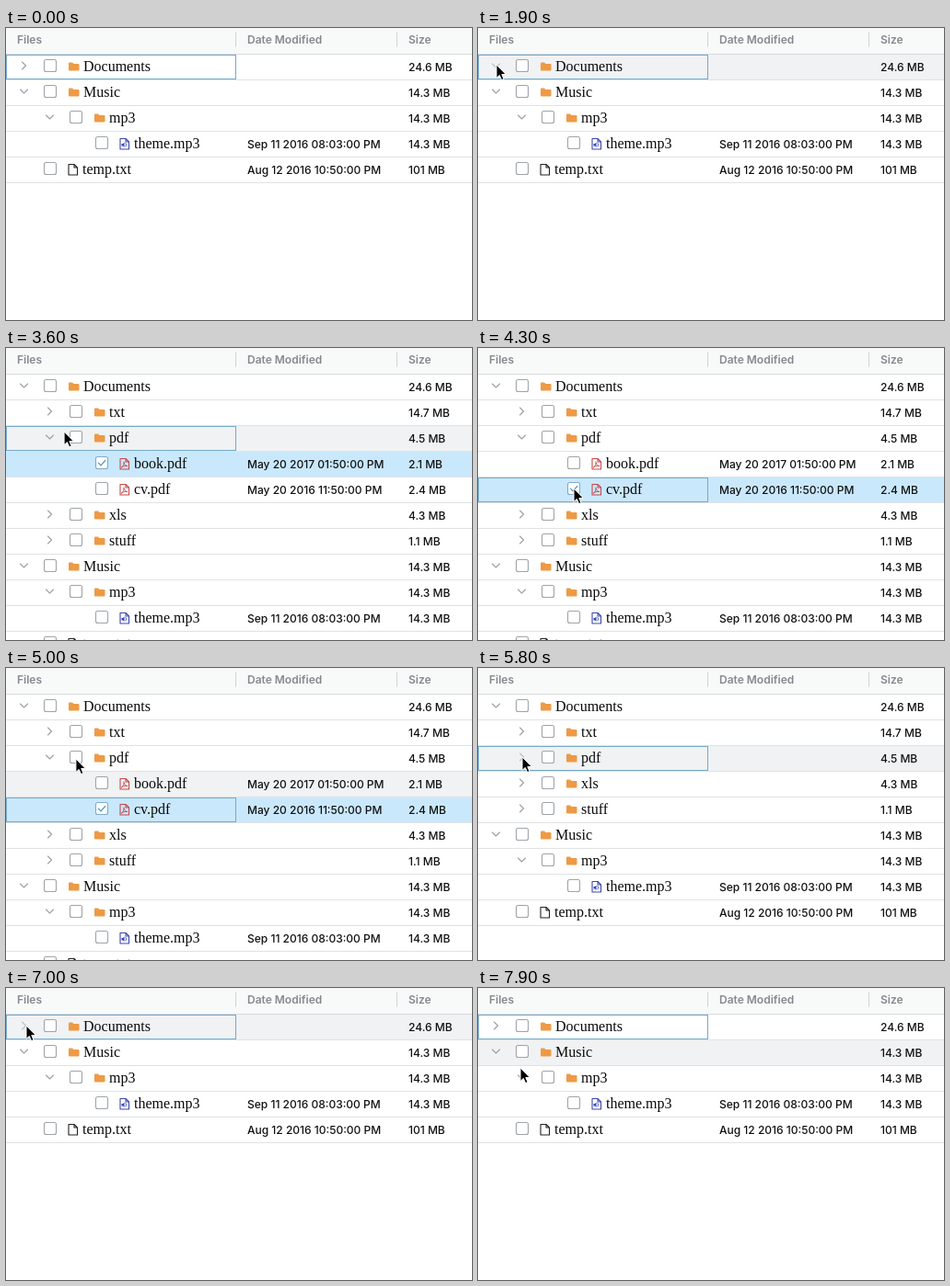
Animation, 506 px wide and 318 px high, one loop 8 s. Source, as an HTML page:

```html
<!DOCTYPE html>
<html>
<head>
<meta charset="utf-8">
<style>
html, body { margin: 0; width: 100%; height: 100%; overflow: hidden; background: #fff; }
svg { display: block; width: 506px; height: 318px; }
text { font: 500 12px Inter, Roboto, sans-serif; fill: #111; white-space: pre; }
.head { font-weight: 600; fill: #85898e; }
.name { font: 16px "Liberation Serif", "Times New Roman", serif; fill: #0a0a0a; }
.line { fill: none; stroke-linejoin: round; stroke-linecap: round; }
</style>
</head>
<body>
<svg id="stage" viewBox="0 0 506 318"></svg>
<script>
const LOOP = 8000, ROW = 28, TOP = 28;
const stage = document.getElementById('stage');

// name, level, kind, size, date, parent
const files = [
  ['Documents', 0, 'folder', '24.6 MB'],
  ['txt', 1, 'folder', '14.7 MB', '', 'Documents'],
  ['pdf', 1, 'folder', '4.5 MB', '', 'Documents'],
  ['book.pdf', 2, 'pdf', '2.1 MB', 'May 20 2017 01:50:00 PM', 'pdf'],
  ['cv.pdf', 2, 'pdf', '2.4 MB', 'May 20 2016 11:50:00 PM', 'pdf'],
  ['xls', 1, 'folder', '4.3 MB', '', 'Documents'],
  ['stuff', 1, 'folder', '1.1 MB', '', 'Documents'],
  ['Music', 0, 'folder', '14.3 MB'],
  ['mp3', 1, 'folder', '14.3 MB', '', 'Music'],
  ['theme.mp3', 2, 'audio', '14.3 MB', 'Sep 11 2016 08:03:00 PM', 'mp3'],
  ['temp.txt', 0, 'text', '101 MB', 'Aug 12 2016 10:50:00 PM'],
];

// time, x, y of the pointer
const path = [
  [1400, 24, 47], [1600, 20, 40], [2200, 20, 40], [2700, 77, 80], [3100, 48, 96],
  [3400, 48, 96], [3600, 63, 91], [4100, 104, 153], [4800, 104, 153], [5000, 76, 99],
  [5300, 48, 97], [5900, 48, 97], [6300, 41, 76], [6500, 22, 41], [7500, 22, 41], [7900, 46, 87],
];

const between = (t, a, b) => t >= a && t < b;

function pointer(t) {
  if (t < path[0][0]) return null;
  const i = path.findIndex(p => p[0] > t);
  if (i < 0) return path[path.length - 1].slice(1);
  const [a, b] = [path[i - 1], path[i]];
  const k = (t - a[0]) / (b[0] - a[0]);
  return [a[1] + (b[1] - a[1]) * k, a[2] + (b[2] - a[2]) * k];
}

function focused(t) {
  if (between(t, 4300, 5600)) return 'cv.pdf';
  return between(t, 3400, 6800) ? 'pdf' : 'Documents';
}

const text = (x, y, s, cls = '') => `<text x="${x}" y="${y}" class="${cls}">${s}</text>`;
const rect = (x, y, w, h, more) => `<rect x="${x}" y="${y}" width="${w}" height="${h}" ${more}/>`;
const line = (d, color, w = 1, more = '') =>
  `<path class="line" d="${d}" stroke="${color}" stroke-width="${w}" ${more}/>`;

const sheet = color => line('M.5 .5H6.5L10 4V12H.5ZM6.5 .5V4H10', color, 1.1);
const icons = {
  folder: '<path d="M0 2Q0 1 1 1H4L5.5 2.5H10.5Q11.5 2.5 11.5 3.5V9Q11.5 10 10.5 10H1Q0 10 0 9Z" fill="#ee9a45"/>',
  text: sheet('#222'),
  pdf: sheet('#c5484c') + line('M2 10C4 8.5 5 6.5 4.5 4M4.5 5C5 7 6 8.5 8.5 8.5C6 8 4 8.5 2 10', '#c5484c', .9),
  audio: sheet('#3a48ae') + '<path d="M2 6H3.5L5 4.5V10L3.5 8.5H2Z" fill="#3a48ae"/>' +
    line('M6.5 5.5Q8 7.3 6.5 9', '#3a48ae', .9),
};

function header() {
  return rect(0, 0, 506, TOP, 'fill="#f8f9f9"') +
    line('M0 28.5H506', '#d8dbdd') +
    line('M249.5 5V20M424.5 5V20', '#cfd2d4') +
    text(12, 17, 'Files', 'head') + text(262, 17, 'Date Modified', 'head') + text(437, 17, 'Size', 'head');
}

function row([name, level, kind, size, date = ''], y, state) {
  const dx = level * 28, folder = kind === 'folder';
  const fill = state.selected ? '#cae8fc' : state.hover ? '#f0f2f3' : '#fff';
  let out = rect(0, y + 1, 506, ROW, `fill="${fill}"`) + line(`M0 ${y + 28.5}H506`, '#dfe2e4');
  if (folder) {
    const d = state.open ? 'm-4 -2l4 4l4 -4' : 'm-2 -4l4 4l-4 4';
    out += line(`M${19.5 + dx} ${y + 13}${d}`, '#9ca1a5', 1.1, state.faint ? 'opacity=".6"' : '');
  }
  out += rect(41.5 + dx, y + 6.5, 13, 13,
    `rx="2" fill="#fff" stroke="${state.selected ? '#7fabc9' : '#a0a4a9'}" stroke-width="1.1"`);
  if (state.selected) out += line(`M${44.5 + dx} ${y + 13.2}l2.5 2.6l4.8 -5.3`, '#4f93c4', 1.2);
  out += `<g transform="translate(${folder ? 68 + dx : 67.5 + dx} ${y + (folder ? 8.5 : 8)})">${icons[kind]}</g>`;
  return out + text((folder ? 84 : 83) + dx, y + 19, name, 'name') +
    text(262, y + 19, date) + text(437, y + 19, size);
}

function draw(t) {
  const open = {
    Documents: between(t, 2000, 6800),
    pdf: between(t, 3400, 5600),
    Music: true,
    mp3: true,
  };
  const shown = files.filter(f => !f[5] || open[f[5]]);
  const at = pointer(t), before = pointer(t - 100);
  const hover = before ? Math.floor((before[1] - TOP) / ROW) : -1;
  const focus = focused(t), selected = t < 4300 ? 'book.pdf' : 'cv.pdf';
  let out = '', frame = '';

  shown.forEach((f, i) => {
    const y = TOP + i * ROW, name = f[0];
    const overArrow = at && Math.hypot(at[0] - 20 - f[1] * 28, at[1] - y - 14) < 5;
    out += row(f, y, {
      selected: name === selected,
      hover: i === hover,
      open: open[name] || (name === 'Documents' && between(t, 1900, 2000)),
      faint: overArrow,
    });
    if (name === focus) frame = rect(.5, y + 1.5, 249, 26, 'fill="none" stroke="#74a9cc"');
  });

  out += header() + frame;
  if (at) {
    out += `<path transform="translate(${at[0].toFixed(2)} ${at[1].toFixed(2)})" d="M0 0V14.5L3.3 11.4L5.6 16.6L8 15.6L5.8 10.5H10.3Z"
      fill="#000" stroke="#fff" stroke-width="1" stroke-linejoin="round"/>`;
  }
  return out;
}

let last = '';
function tick() {
  const next = draw(performance.now() % LOOP);
  if (next !== last) stage.innerHTML = last = next;
  requestAnimationFrame(tick);
}
tick();
</script>
</body>
</html>
```
